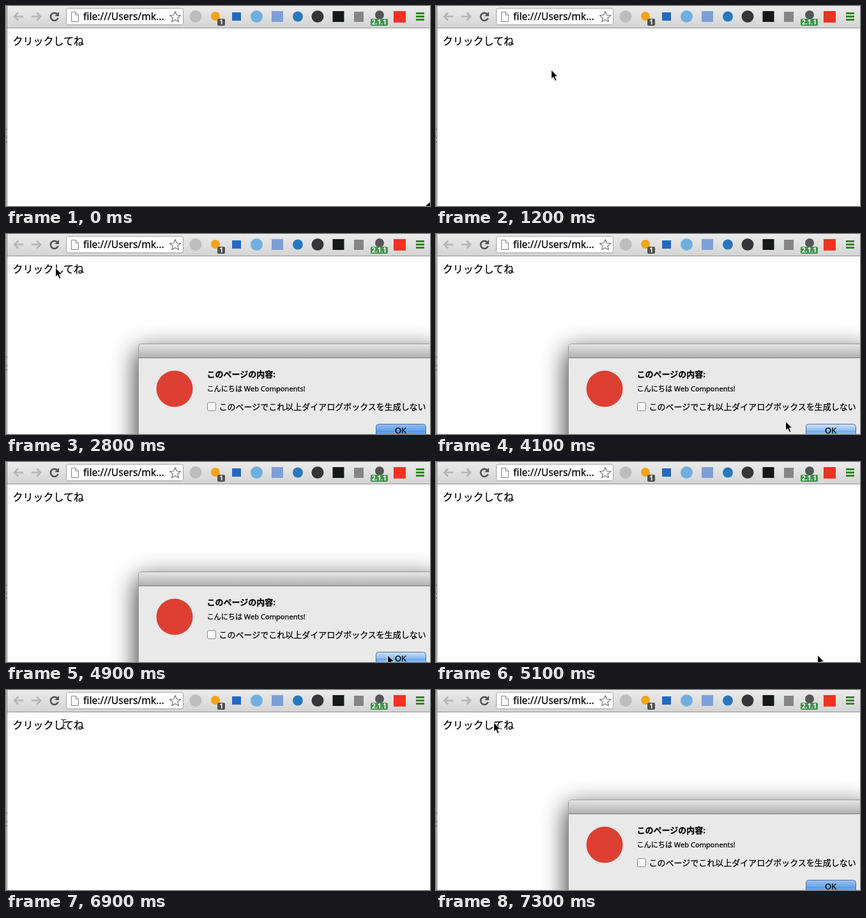
Recreate the animation shown at these times as an HTML page. Size 664 by 314 pixels, loop 7.4 s.

```html
<!DOCTYPE html>
<html lang="ja">
<head>
<meta charset="utf-8">
<title>Click demo</title>
<style>
html, body { margin: 0; width: 100%; height: 100%; overflow: hidden; background: #fefefe; }
svg { display: block; width: 664px; height: 314px; }
text { font-family: "Noto Sans", "Noto Sans CJK JP", "Noto Sans CJK", sans-serif; fill: #000; stroke: #000; stroke-width: .25px; }
.badge { font-size: 10px; font-weight: 700; fill: #fff; stroke: none; text-anchor: middle; }
</style>
</head>
<body>
<svg viewBox="0 0 664 314">
  <defs>
    <linearGradient id="bar" x2="0" y2="1"><stop stop-color="#ebebeb"/><stop offset="1" stop-color="#d4d4d4"/></linearGradient>
    <linearGradient id="title" x2="0" y2="1"><stop stop-color="#e6e6e6"/><stop offset="1" stop-color="#b0b0b0"/></linearGradient>
    <linearGradient id="button" x2="0" y2="1"><stop stop-color="#d3e5f8"/><stop offset=".48" stop-color="#8dbcf0"/><stop offset=".5" stop-color="#67a7ee"/><stop offset="1" stop-color="#b9e2ff"/></linearGradient>
    <filter id="blur" x="-30%" y="-60%" width="160%" height="220%"><feGaussianBlur stdDeviation="19"/></filter>
  </defs>

  <rect width="664" height="314" fill="#fefefe"/>
  <rect width="664" height="34" fill="url(#bar)"/>
  <path d="M0 34.5H664" stroke="#929292"/>
  <path d="M.5 0V314" stroke="#d0d0d0"/>
  <path d="M1.5 0V314" stroke="#777"/>
  <path d="M0 193.5H2M0 206.5H2M0 213.5H2" stroke="#555"/>

  <g fill="none" stroke="#b5b5b5" stroke-width="2.6">
    <path d="M27 16.5H13M19 10.5L13 16.5L19 22.5"/>
    <path d="M40 16.5H54M48 10.5L54 16.5L48 22.5"/>
    <path d="M80.5 13A6 6 0 1 0 81.5 19" stroke="#555"/>
  </g>
  <path d="M83 9V16H76Z" fill="#555"/>

  <rect x="94.5" y="3.5" width="183" height="26" rx="3" fill="#fff" stroke="#a2a2a2"/>
  <path d="M102.5 9.5H109L113.5 14V24.5H102.5ZM109 9.5V14H113.5" fill="#fafafa" stroke="#858585"/>
  <text x="121" y="22" font-size="15.6">file:///Users/mk...</text>
  <path id="star" fill="#fff" stroke="#777" stroke-width="1.2" stroke-linejoin="round"/>

  <!-- extension buttons -->
  <circle cx="297" cy="16.5" r="9.5" fill="#bdbdbd"/>
  <circle cx="328" cy="16" r="7" fill="#f5a316"/>
  <rect x="331" y="20" width="12" height="11" rx="2" fill="#505050"/>
  <text class="badge" x="337" y="29.3">1</text>
  <rect x="354" y="10" width="14" height="13" fill="#2669c0"/>
  <circle cx="392.5" cy="16.5" r="9.5" fill="#6eafdf"/>
  <rect x="416" y="8" width="18" height="17" fill="#7d9fd8"/>
  <circle cx="457" cy="16.5" r="8" fill="#2878bd"/>
  <circle cx="488" cy="16.5" r="9.5" fill="#343639"/>
  <rect x="511.5" y="8" width="18" height="17" fill="#151a18"/>
  <rect x="545" y="9" width="15" height="16" fill="#858585"/>
  <circle cx="585" cy="14" r="7" fill="#555"/>
  <rect x="571" y="20" width="27" height="11" rx="2" fill="#43924c"/>
  <text class="badge" x="584.5" y="29.3">2.1.1</text>
  <rect x="607" y="8" width="19" height="18" fill="#f03223"/>
  <path d="M642 11.5H655M642 16.5H655M642 21.5H655" stroke="#328522" stroke-width="3"/>

  <text x="10.5" y="60.5" font-size="16">クリックしてね</text>

  <g id="dialog">
    <rect x="205" y="183" width="476" height="186" rx="5" opacity=".8" filter="url(#blur)"/>
    <rect x="207.5" y="172.5" width="471" height="168" rx="4" fill="#e9e9e9" stroke="#9a9a9a"/>
    <path d="M208 194V177Q208 173 212 173H674Q678 173 678 177V194Z" fill="url(#title)"/>
    <path d="M208 194.5H678" stroke="#7c7c7c"/>
    <circle cx="264" cy="243" r="28.5" fill="#dd4032"/>
    <text x="314.5" y="224.5" font-size="13" font-weight="700">このページの内容:</text>
    <text x="314.5" y="247" font-size="11.1">こんにちは Web Components!</text>
    <rect x="315.5" y="264.5" width="13" height="13" rx="2.5" fill="#fafafa" stroke="#8a8a8a"/>
    <text x="333.5" y="275.5" font-size="13">このページでこれ以上ダイアログボックスを生成しない</text>
    <rect x="579.5" y="298.5" width="78" height="21" rx="4" fill="url(#button)" stroke="#536f99"/>
    <rect id="pulse" x="580" y="299" width="77" height="20" rx="4" fill="#2675dd"/>
    <text x="618" y="313" font-size="13" text-anchor="middle">OK</text>
  </g>

  <path id="corner" d="M664 308V314H657Z"/>
  <path id="arrow" d="M.5 0V14.5L3.8 11.5L6.5 17.5L9 16.3L6.5 10.5H11Z" stroke="#fff"/>
  <path id="beam" d="M-4 -7.5Q0 -7.5 0 -5Q0 -7.5 4 -7.5M0 -5V5M-4 7.5Q0 7.5 0 5Q0 7.5 4 7.5M-2 2.5H2" fill="none" stroke="#222" stroke-width="1.2"/>
</svg>
<script>
const LOOP = 7400, STEP = 100;
const [star, dialog, pulse, corner, arrow, beam] =
  ["star", "dialog", "pulse", "corner", "arrow", "beam"].map(id => document.getElementById(id));

// time, x, y of the pointer's hot spot
const route = [
  [0, 661, 309], [800, 340, 173], [1300, 140, 82], [1600, 92, 53], [1700, 77, 53],
  [3300, 77, 53], [3800, 420, 238], [4100, 547, 294], [4500, 604, 305], [4900, 597, 303],
  [5700, 597, 303], [6100, 250, 145], [6400, 96, 55], [6600, 90, 51], [LOOP, 90, 51]
];

star.setAttribute("d", "M" + Array.from({ length: 10 }, (_, i) => {
  const angle = (i / 5 - 0.5) * Math.PI, radius = i % 2 ? 4 : 9;
  return [265 + radius * Math.cos(angle), 17.5 + radius * Math.sin(angle)];
}).join("L") + "Z");

function pointerAt(t) {
  const i = route.findIndex(point => point[0] > t);
  const [t0, x0, y0] = route[i - 1], [t1, x1, y1] = route[i];
  const k = (t - t0) / (t1 - t0);
  return [x0 + (x1 - x0) * k, y0 + (y1 - y0) * k];
}

// The panel zooms in over two steps and fades out over one.
function panelAt(t) {
  const opened = t >= 7000 ? 7000 : 2600;
  const age = t - opened;
  if (age < 0 || (t >= 5100 && t < 7000)) return { scale: 1, opacity: 0, age: 0 };
  if (age < 100) return { scale: 0.174, opacity: 0.25, age };
  if (age < 200) return { scale: 0.72, opacity: 0.75, age };
  return { scale: 1, opacity: t >= 5000 && t < 5100 ? 0.4 : 1, age };
}

const show = (node, visible) => node.setAttribute("visibility", visible ? "visible" : "hidden");

function draw(now) {
  const t = Math.floor(now % LOOP / STEP) * STEP;
  const panel = panelAt(t), [x, y] = pointerAt(t);

  show(dialog, panel.opacity > 0);
  dialog.setAttribute("opacity", panel.opacity);
  dialog.setAttribute("transform",
    `translate(443 258) scale(${panel.scale}) translate(-443 -258)`);
  pulse.setAttribute("opacity", 0.18 + 0.18 * Math.cos((panel.age - 200) / 870 * 2 * Math.PI));

  const overText = !panel.opacity && x < 125 && y < 68;
  show(corner, t === 0);
  show(arrow, t > 0 && !overText);
  show(beam, overText);
  arrow.setAttribute("transform", `translate(${x} ${y})`);
  beam.setAttribute("transform", `translate(${x} ${y + 2.5})`);
}

const start = performance.now();
function tick() {
  draw(performance.now() - start);
  requestAnimationFrame(tick);
}
tick();
</script>
</body>
</html>
```
